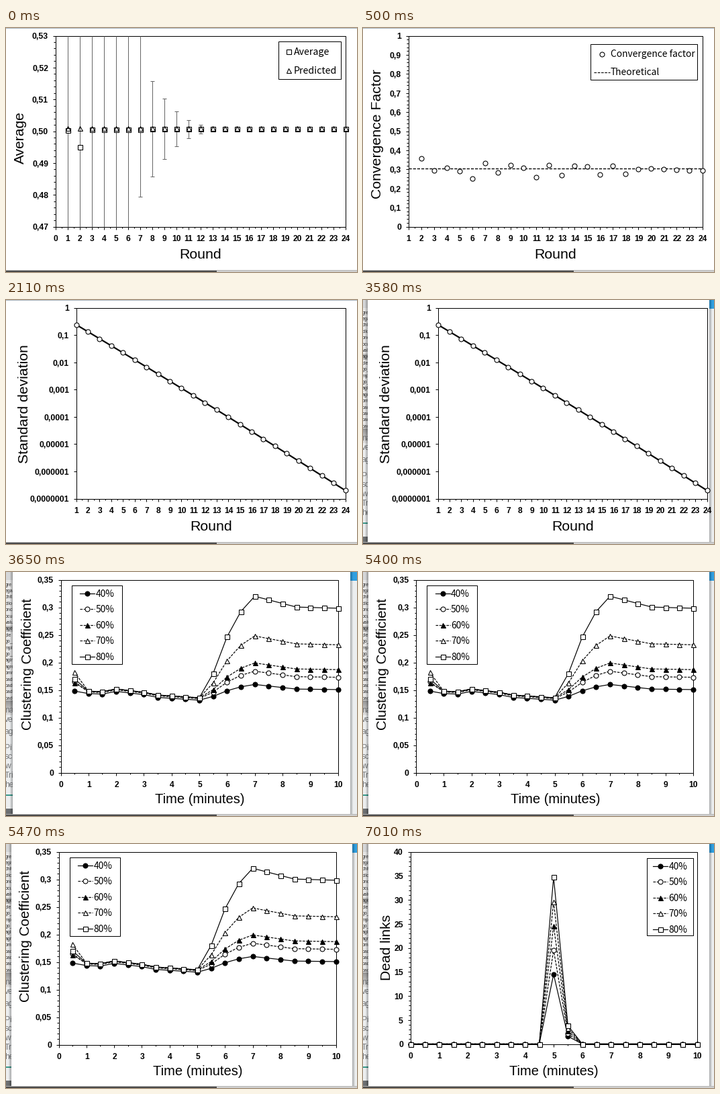
These frames come from a looping animation (523x363 px, 8000 ms). A matplotlib script:

```python
import numpy as np
import matplotlib.pyplot as plt
from matplotlib.animation import FuncAnimation
from matplotlib.patches import Rectangle

W, H = 523, 363
LOOP, STEP = 8000, 20
PT = 0.72  # points per pixel at 100 dpi
INK, BAR = "black", "#666666"
SANS = "Liberation Sans"
HUMANIST = ["Noto Sans CJK JP", "Liberation Sans"]
DASH = (0, (3, 1.4))

fig = plt.figure(figsize=(W / 100, H / 100), dpi=100, facecolor="white")


def layer():
    """Full-stage axes in pixel units, y pointing down."""
    ax = fig.add_axes([0, 0, 1, 1])
    ax.set(xlim=(0, W), ylim=(H, 0))
    ax.axis("off")
    return ax


def rect(ax, x, y, w, h, color, edge="none", **kw):
    patch = Rectangle((x, y), w, h, fc=color, ec=edge, lw=PT, **kw)
    return ax.add_patch(patch)


def write(ax, x, y, s, size, ha="center", font=SANS, color=INK, **kw):
    """Text whose capitals are centred on y."""
    ax.text(x, y + 0.36 * size, s, size=size * PT, ha=ha, va="baseline",
            family=font, color=color, **kw)


def marks(ax, xs, ys, marker, fill="white", line="none", width=1.2, **kw):
    ax.plot(xs, ys, color=INK, ls=line, lw=width * PT, marker=marker,
            ms=7 * PT, mfc=fill, mec=INK, mew=1.1 * PT, **kw)


def comma(v, spec="g"):
    return format(v, spec).replace(".", ",")


class Chart:
    def __init__(self, box, xlim, ylim, ylabels, minor=5):
        self.box, self.xlim, self.ylim = box, xlim, ylim
        self.ax = ax = layer()
        left, top, right, bottom = box
        rect(ax, left, top, right - left, bottom - top, "none", INK)

        rows = len(ylabels) - 1
        gap = (bottom - top) / rows
        for k, s in enumerate(ylabels):
            write(ax, left - 10.5, bottom + .5 - k * gap, s, 12.3, "right",
                  weight="bold")
        major = [bottom - k * gap for k in range(rows + 1)]
        small = [bottom - k * gap / minor for k in range(rows * minor + 1)]
        ax.hlines(major, left - 4, left, color=INK, lw=PT)
        ax.hlines(small, left - 2.5, left, color=INK, lw=PT)

        first, last = xlim
        for n in range(first, last + 1):
            write(ax, self.x(n) + .5, bottom + 17, str(n), 12, weight="bold")
        major = [self.x(n) for n in range(first, last + 1)]
        small = [self.x(first + n / 2) for n in range(2 * (last - first))]
        ax.vlines(major, bottom, bottom + 4, color=INK, lw=PT)
        ax.vlines(small, bottom, bottom + 2.5, color=INK, lw=PT)

    def x(self, v):
        a, b = self.xlim
        return self.box[0] + (v - a) / (b - a) * (self.box[2] - self.box[0])

    def y(self, v):
        a, b = self.ylim
        return self.box[3] - (v - a) / (b - a) * (self.box[3] - self.box[1])

    def series(self, xs, ys, *style, **kw):
        marks(self.ax, self.x(xs), self.y(ys), *style, **kw)

    def titles(self, xname, xpos, xsize, yname, ypos, ysize):
        write(self.ax, *xpos, xname, xsize)
        self.ax.text(*ypos, yname, size=ysize * PT, family=SANS, color=INK,
                     rotation=90, rotation_mode="anchor",
                     ha="center", va="baseline")

    def frame(self, x0, y0, x1, y1):
        rect(self.ax, x0 - .5, y0 - .5, x1 - x0, y1 - y0, "white", INK,
             zorder=3)

    def key(self, x, y, text_x, name, size, *style, reach=0):
        """One legend row; reach is half the length of its line."""
        marks(self.ax, [x - reach, x, x + reach], [y] * 3, *style,
              markevery=[1], zorder=4)
        write(self.ax, text_x, y, name, size, "left", HUMANIST, zorder=4)


def average_chart():
    c = Chart((73.5, 11.5, 505.5, 295.5), (0, 24), (.47, .53),
              [comma(.47 + k / 100, ".2f") for k in range(7)])
    mean = .5007
    for n in range(1, 13):
        k = n - 7
        half = .0212 * np.exp(-.3 * k - .05 * k * k)
        low = mean - half if n > 6 else .47
        high = mean + half if n > 7 else .53
        x = c.x(n)
        c.ax.vlines(x, c.y(high), c.y(low), color=BAR, lw=PT)
        caps = [c.y(v) for v in (low, high) if .47 < v < .53]
        c.ax.hlines(caps, x - 3, x + 3, color=BAR, lw=PT)
    rounds = np.arange(1, 25)
    means = mean - .0006 * .75 ** rounds
    means[1] -= .0053
    c.series(rounds, means, "s")
    c.series(rounds, np.full(24, .5009), "^", "none")
    c.titles("Round", (289.5, 335), 21.3, "Average", (27, 163.5), 21)
    c.frame(406, 20, 499, 76)
    c.key(420.5, 35, 429, "Average", 14.2, "s")
    c.key(420.5, 63, 429, "Predicted", 14.2, "^")
    return c.ax


def factor_chart():
    c = Chart((67.5, 11.5, 505.5, 295.5), (1, 24), (0, 1),
              [comma(k / 10) for k in range(11)])
    c.ax.plot(c.box[::2], [c.y(.303)] * 2, color=INK, lw=1.4 * PT, ls=DASH)
    n = np.arange(2, 25)
    quick = .034 * np.cos(2 * np.pi * (n - 2) / 2.5) * np.exp(-(n / 19) ** 12)
    slow = .028 * np.cos(2 * np.pi * (n - 2.5) / 6) * np.exp(-(n - 2) / 12)
    c.series(n, .298 + quick + slow, "o")
    c.titles("Round", (287, 335), 21.3,
             "Convergence Factor", (27, 158), 21.3)
    c.frame(339, 24, 498, 77)
    c.key(355.5, 38.5, 369, "Convergence factor", 13.8, "o")
    c.key(355.5, 65.5, 369, "Theoretical", 13.8, "", "none", DASH, reach=12)
    return c.ax


def deviation_chart():
    c = Chart((104.5, 11.5, 505.5, 295.5), (1, 24), (-7, 0),
              [comma(10 ** -k, f".{k}f") for k in range(7, -1, -1)], 1)
    n = np.arange(1, 25)
    logs = -.62 - .2643 * (n - 1) + .05 * np.sin(np.pi * (n - 1) / 23)
    c.series(n, logs, "o", line="-", width=2.2)
    c.titles("Round", (305.5, 335), 21.3,
             "Standard deviation", (33, 155), 21.3)
    return c.ax


STYLES = [("40%", "o", INK, "-"), ("50%", "o", "white", DASH),
          ("60%", "^", INK, DASH), ("70%", "^", "white", DASH),
          ("80%", "s", "white", "-")]


def percent_chart(c, times, curves, frame, x, y):
    """Draw one curve per style and the legend beside mark column x."""
    c.frame(*frame)
    for k, (curve, (name, *style)) in enumerate(zip(curves, STYLES)):
        c.series(times, curve, *style)
        c.key(x, y + 23.4 * k, x + 12.5, name, 13.8, *style, reach=11)


def clustering_chart():
    c = Chart((81.5, 11.5, 494.5, 298.5), (0, 10), (0, .35),
              [comma(round(k * .05, 2)) for k in range(8)])
    t = np.arange(1, 21) / 2
    settle = np.interp(t, [1, 1.5, 2, 3, 3.5, 5],
                       [.148, .147, .152, .146, .141, .136])
    rise = np.interp(t, [5, 5.5, 6, 6.5, 7], [0, .24, .6, .85, 1])
    fall = np.interp(t, [7, 8.5, 10], [0, .9, 1])
    starts = [.148, .165, .163, .182, .17]
    peaks = [.16, .184, .199, .248, .32]
    curves = []
    for k, (start, peak) in enumerate(zip(starts, peaks)):
        low = .136 - .0045 * np.exp(-k)
        growth = peak - low
        curve = settle - .136 + low + growth * rise
        curve -= (.007 + .08 * growth) * fall
        curve[0] = start
        curves.append(curve)
    c.titles("Time (minutes)", (289, 336.5), 20.1,
             "Clustering Coefficient", (38, 137), 20.6)
    percent_chart(c, t, curves, (98, 20, 173, 137), 121, 32)
    return c.ax


def links_chart():
    c = Chart((70.5, 11.5, 497.5, 297.5), (0, 10), (0, 40),
              [str(5 * k) for k in range(9)])
    t = np.arange(21) / 2
    burst = np.interp(t, [4.5, 5, 5.5, 6], [0, 1, .11, 0])
    curves = [(14.5 + 5.05 * k) * burst for k in range(5)]
    c.titles("Time (minutes)", (284.5, 336.5), 20,
             "Dead links", (41, 154), 21)
    percent_chart(c, t, curves, (423, 21, 492, 136), 443, 33)
    return c.ax


def draw_page():
    ax = layer()
    rect(ax, 0, 0, W, H, "#eceeef")
    rect(ax, 0, 0, 20, 12, "#d4d6d8")
    rect(ax, 0, 12, 20, 179, "#e6e6e6")
    rect(ax, 0, 80, 20, 9, "#bdbdbd")
    for k in range(22):
        rect(ax, 0, 191 + k, 20, 1, str(.58 + .014 * k))
    rect(ax, 0, 331, 20, 2, "#3a9a8c")
    rect(ax, 0, 352, 20, 11, "#6c6f72")
    rect(ax, 505, 0, 18, 13, "#2f9fe0")
    bits = ("gre ega chit bllo oncl ocu valu age ple go_ "
            "mpl go_ agin agre omm oad oad oad oad").split()
    for k, s in enumerate(bits):
        write(ax, -1, 18 + 9.4 * k, s, 7, "left", color="#333333")
    for y, s in ((205, "na"), (219, "ve"), (237, "ag"), (261, "Pi"),
                 (274, "sc"), (288, "w r"), (302, "Tri"), (316, "he")):
        write(ax, -2, y, s, 12, "left", color="#77797b")

    shades = [rect(ax, 0, 0, 1, 360, "black", alpha=.07, zorder=4)
              for _ in range(4)]
    window = rect(ax, 0, 0, 1, 360, "white", zorder=5)
    rect(ax, 0, 360, W, 1, "#b8b8b8", zorder=6)
    rect(ax, 0, 361, 314, 2, "#4a4a4a", zorder=6)
    rect(ax, 314, 361, W - 314, 2, "#cfcfcf", zorder=6)
    edge = rect(ax, 0, 0, W, 1, "#aab6c0", zorder=6)
    return shades, window, edge


shades, window, edge = draw_page()
average, factor, deviation = average_chart(), factor_chart(), deviation_chart()
clustering, links = clustering_chart(), links_chart()
charts = [average, factor, deviation, clustering, links]

# start in ms, chart, chart shift, window left, window right
SCENES = [
    (0, average, 0, -9, W + 9),
    (500, factor, 0, -9, W + 9),
    (2110, deviation, 0, -9, W + 9),
    (3580, deviation, 7, 7, 516),
    (3650, clustering, 0, 10, 513),
    (5400, clustering, -2.5, 8, 516),
    (5470, clustering, -3, 8, 516),
    (7010, links, 0, 8, 516),
]


def update(i):
    t = i * STEP + STEP / 2
    _, chart, shift, left, right = [s for s in SCENES if s[0] <= t][-1]
    for ax in charts:
        ax.set_visible(ax is chart)
    chart.set_xlim(-shift, W - shift)
    window.set_x(left)
    window.set_width(right - left)
    for k, shade in enumerate(shades, 1):
        shade.set_x(left - k)
        shade.set_width(right - left + 2 * k)
    edge.set_visible(left < 0)
    return charts


anim = FuncAnimation(fig, update, frames=LOOP // STEP, interval=STEP,
                     init_func=lambda: update(0), repeat=True,
                     repeat_delay=0, blit=False)
plt.show()
```
